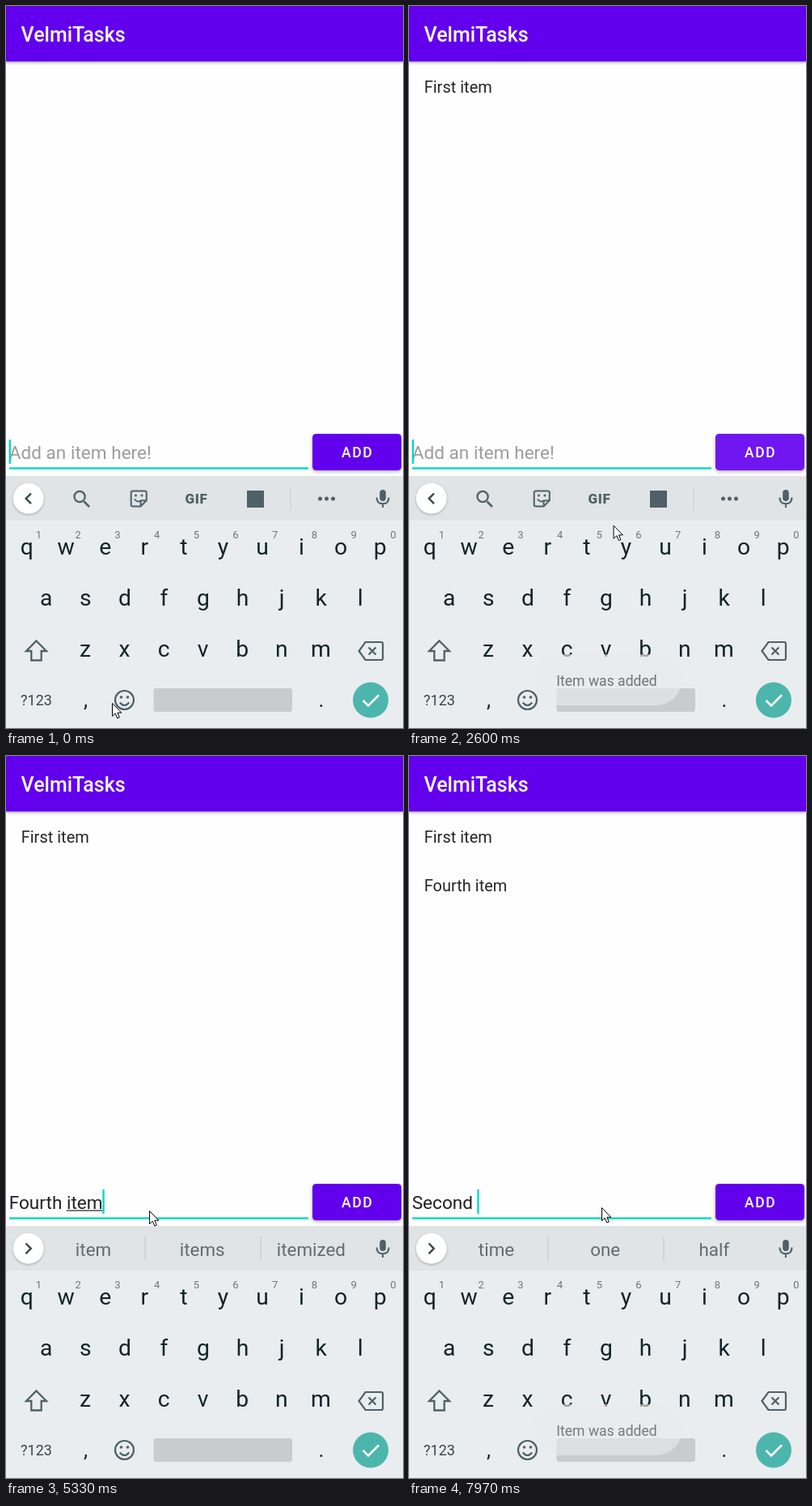
An HTML page with a canvas that plays this animation: 491 px wide and 891 px high, repeating every 8000 ms.

```html
<!DOCTYPE html>
<html lang="en">
<head>
<meta charset="utf-8">
<title>Task list</title>
<style>
html, body { margin: 0; width: 100%; height: 100%; overflow: hidden; background: #fefefe; }
canvas { display: block; width: 491px; height: 891px; }
</style>
</head>
<body>
<canvas id="stage"></canvas>
<script>
const W = 491, H = 891, LOOP = 8000;
const PURPLE = '#6200ee', TEAL = '#03dac5', ICON = '#4f6068', KEY = '#12232a';
const canvas = document.getElementById('stage');
const ctx = canvas.getContext('2d');
const dpr = window.devicePixelRatio || 1;
canvas.width = W * dpr;
canvas.height = H * dpr;

// time, field content, suggestions
const EDITS = [
  [0, '', ''],
  [180, 'F', 'F For From'],
  [300, 'Fi', 'Fi Fine Find'],
  [500, 'Firs', 'Firs First Firstly'],
  [620, 'First', 'First Firsts Firsthand'],
  [740, 'First ', 'time of one'],
  [920, 'First i', 'I in is'],
  [1010, 'First it', 'it its item'],
  [1090, 'First ite', 'item items iterate'],
  [1160, 'First item', 'item items itemized'],
  [2300, '', ''],
  [3230, 'F', 'F For From'],
  [3440, 'Fo', 'Fo For Forward'],
  [3620, 'Fou', 'Four Found Fountain'],
  [3680, 'Four', 'Four Fourth Fourteen'],
  [3770, 'Fourt', 'Fourth Fourteen Forth'],
  [3830, 'Fourth', 'Fourth Fourths Forth'],
  [4010, 'Fourth ', 'of grade quarter'],
  [4260, 'Fourth I', 'I It Is'],
  [4850, 'Fourth it', 'it its item'],
  [4910, 'Fourth ite', 'item items iterate'],
  [5010, 'Fourth item', 'item items itemized'],
  [5740, '', ''],
  [6870, 'S', 'S So See'],
  [7080, 'Se', 'Se See Send'],
  [7260, 'Sec', 'Sec Second Section'],
  [7350, 'Seco', 'Second Seconds Secondly'],
  [7500, 'Secon', 'Second Seconds Secondary'],
  [7590, 'Second', 'Second Seconds Secondary'],
  [7820, 'Second ', 'time one half']
];

// time, x, y of the pointer
const POINTER = [
  [0, 131, 860], [1470, 131, 860], [1500, 145, 864], [1650, 145, 864],
  [1860, 414, 579], [2000, 438, 552], [2140, 442, 547], [2390, 442, 547],
  [2600, 253, 641], [2850, 151, 559], [5300, 151, 559], [5330, 176, 561],
  [5570, 430, 552], [5830, 430, 552], [6130, 238, 557]
];

const CLICKS = [2290, 5720];
const TOASTS = [[2400, 4400], [5830, 7850]];
const ITEMS = [[2300, 'First item'], [5740, 'Fourth item']];

const clamp = v => Math.max(0, Math.min(1, v));
const latest = (rows, t) => rows.filter(r => r[0] <= t).pop();

function font(size, weight = 400) {
  ctx.font = `${weight} ${size}px Roboto, sans-serif`;
}

function text(s, x, y, size, color, align = 'left', weight = 400) {
  font(size, weight);
  ctx.fillStyle = color;
  ctx.textAlign = align;
  ctx.fillText(s, x, y);
}

function rect(x, y, w, h, color) {
  ctx.fillStyle = color;
  ctx.fillRect(x, y, w, h);
}

function round(x, y, w, h, r, color) {
  ctx.beginPath();
  ctx.roundRect(x, y, w, h, r);
  ctx.fillStyle = color;
  ctx.fill();
}

function disc(x, y, r, color) {
  ctx.beginPath();
  ctx.arc(x, y, r, 0, 7);
  ctx.fillStyle = color;
  ctx.fill();
}

function stroke(d, width = 2, color = ICON) {
  ctx.lineWidth = width;
  ctx.strokeStyle = color;
  ctx.stroke(new Path2D(d));
}

function shadow(color, blur, dy) {
  ctx.shadowColor = color;
  ctx.shadowBlur = blur * dpr;
  ctx.shadowOffsetY = dy * dpr;
}

const noShadow = () => shadow('transparent', 0, 0);

function drawHeader() {
  shadow('rgba(0,0,0,.3)', 4, 1);
  rect(0, 0, W, 68.5, PURPLE);
  noShadow();
  text('VelmiTasks', 18.5, 44, 25, '#fff', 'left', 500);
}

function drawField(t, [since, value]) {
  const x = 3.7, base = 559, size = 22.6;
  rect(4, 569.3, 370, 2.4, TEAL);
  text(value || 'Add an item here!', x, base, size, value ? '#212121' : '#9c9c9c');
  const end = x + ctx.measureText(value).width;
  if (value) {
    const from = x + ctx.measureText(value.slice(0, value.lastIndexOf(' ') + 1)).width;
    rect(from, 560.3, end - from, 1.3, '#333');
  }
  if ((t - since) % 1000 < 500) rect(value ? end - 0.3 : 3.6, 535, 2.4, 30, TEAL);
}

function drawButton(t) {
  shadow('rgba(0,0,0,.35)', 4, 1.5);
  round(379, 528, 110, 45, 4.5, PURPLE);
  noShadow();
  for (const c of CLICKS) {
    const p = (t - c) / 380;
    if (p < 0 || p > 1) continue;
    ctx.save();
    ctx.beginPath();
    ctx.roundRect(379, 528, 110, 45, 4.5);
    ctx.clip();
    disc(436, 550, 20 + 70 * clamp(p * 1.8), `rgba(255,255,255,${0.24 * clamp(2 - 2 * p)})`);
    ctx.restore();
  }
  ctx.letterSpacing = '1.55px';
  text('ADD', 415, 557, 17.5, '#fff', 'left', 500);
  ctx.letterSpacing = '0px';
}

function drawTools() {
  stroke('M96.5 611.5L103 618', 2.6);
  stroke('M97.7 605.5a6.6 6.6 0 1 1-13.2 0a6.6 6.6 0 1 1 13.2 0', 2.3);
  stroke('M157 598.5h14.5q2.3 0 2.3 2.3v9.4l-7.2 7.3h-9.6q-2.3 0-2.3-2.3v-14.4q0-2.3 2.3-2.3zM173.5 610.2h-4.6q-2.3 0-2.3 2.3v4.8');
  stroke('M159 608.5q3.5 5 8 1.5');
  disc(160.5, 604, 1.5, ICON);
  disc(168, 604, 1.5, ICON);
  ctx.letterSpacing = '.7px';
  text('GIF', 235.5, 614, 17, ICON, 'center', 900);
  ctx.letterSpacing = '0px';
  rect(298, 598, 21, 21, ICON);
  rect(351.3, 594, 1.2, 28, '#c8cdd0');
  for (const x of [388.5, 396.5, 404.5]) disc(x, 608, 2.5, ICON);
}

function drawStrip(chips) {
  rect(0, 580, W, 55.5, '#e0e4e6');
  shadow('rgba(0,0,0,.28)', 3, 1);
  disc(27.7, 607.8, 19, '#fff');
  noShadow();
  stroke(chips ? 'M24.5 601.5l6.3 6.3-6.3 6.3' : 'M31 601.5l-6.3 6.3 6.3 6.3', 2.4, '#37474f');
  if (chips) {
    chips.split(' ').forEach((c, i) => text(c, 108 + 134.7 * i, 616.8, 22.4, '#5f6c72', 'center'));
    rect(171.5, 593, 1.2, 30, '#c5cacd');
    rect(314.5, 593, 1.2, 30, '#c5cacd');
  } else drawTools();
  round(462.2, 597, 7.6, 14, 3.8, ICON);
  stroke('M458.5 606.5q0 7.8 7.5 7.8t7.5-7.8M466 614v5', 2.1);
}

function drawKeys() {
  rect(0, 635, W, 256, '#e9edf0');
  const row = (letters, x, y) =>
    [...letters].forEach((k, i) => text(k, x + 48.55 * i, y, 28.3, KEY, 'center'));
  row('qwertyuiop', 25.7, 677);
  row('asdfghjkl', 49.8, 740);
  row('zxcvbnm', 98, 803);
  [...'1234567890'].forEach((n, i) => text(n, 40.5 + 48.7 * i, 657, 13, '#68767c', 'center'));

  stroke('M37.5 783.5L50 796h-6.3v11.5H31.3V796H25z', 2.3);
  stroke('M444.5 785H464q2 0 2 2v18q0 2-2 2h-19.500l-8-11zM448.500 791.500l9 9M457.500 791.500l-9 9', 2.2);

  text('?123', 37.5, 863, 18, '#37474f', 'center');
  text(',', 98.5, 865, 26, KEY, 'center');
  text('.', 390, 865, 26, KEY, 'center');
  stroke('M158 856.500a11.500 11.500 0 1 1-23 0a11.500 11.500 0 1 1 23 0', 2.2);
  stroke('M140.800 859.500q5.700 7 11.400 0');
  disc(142.5, 853, 1.8, ICON);
  disc(150.5, 853, 1.8, ICON);
  round(182.5, 842, 171.5, 29, 3, '#c8cccf');
  disc(451, 856.5, 22, '#4db6ac');
  stroke('M441.500 857l6.500 6.500 13-13', 2.5, '#fff');
}

function drawToast(t) {
  const show = TOASTS.find(([a, b]) => t >= a && t < b + 300);
  if (!show) return;
  const [a, b] = show;
  const fadeIn = 1 - Math.pow(1 - clamp((t - a) / 440), 1.6);
  ctx.globalAlpha = fadeIn * (1 - clamp((t - b) / 300));
  round(152, 800, 185.5, 63, 31.5, '#ebebeb');
  text('Item was added', 244.5, 838.5, 17.6, '#2c2c2c', 'center');
  ctx.globalAlpha = 1;
}

function drawPointer(t) {
  const i = POINTER.findIndex(p => p[0] > t);
  const b = i < 0 ? POINTER[POINTER.length - 1] : POINTER[i];
  const a = i < 0 ? b : POINTER[i - 1];
  const p = a === b ? 0 : (t - a[0]) / (b[0] - a[0]);
  ctx.save();
  ctx.translate(a[1] + (b[1] - a[1]) * p + 0.5, a[2] + (b[2] - a[2]) * p + 0.5);
  const arrow = new Path2D('M0 0V16L3.700 12.600L6.300 18.500L8.800 17.400L6.300 11.700H11.300z');
  ctx.fillStyle = '#fff';
  ctx.fill(arrow);
  ctx.lineWidth = 1;
  ctx.strokeStyle = '#000';
  ctx.stroke(arrow);
  ctx.restore();
}

function draw(t) {
  ctx.setTransform(dpr, 0, 0, dpr, 0, 0);
  rect(0, 0, W, H, '#fefefe');
  const edit = latest(EDITS, t);
  drawHeader();
  ITEMS.forEach(([since, label], i) => {
    if (t >= since) text(label, 18.7, 107 + 60 * i, 20, '#252525');
  });
  drawField(t, edit);
  drawButton(t);
  drawStrip(edit[2]);
  drawKeys();
  drawToast(t);
  drawPointer(t);
}

const start = performance.now();
function tick() {
  draw((performance.now() - start) % LOOP);
  requestAnimationFrame(tick);
}
tick();
</script>
</body>
</html>
```
